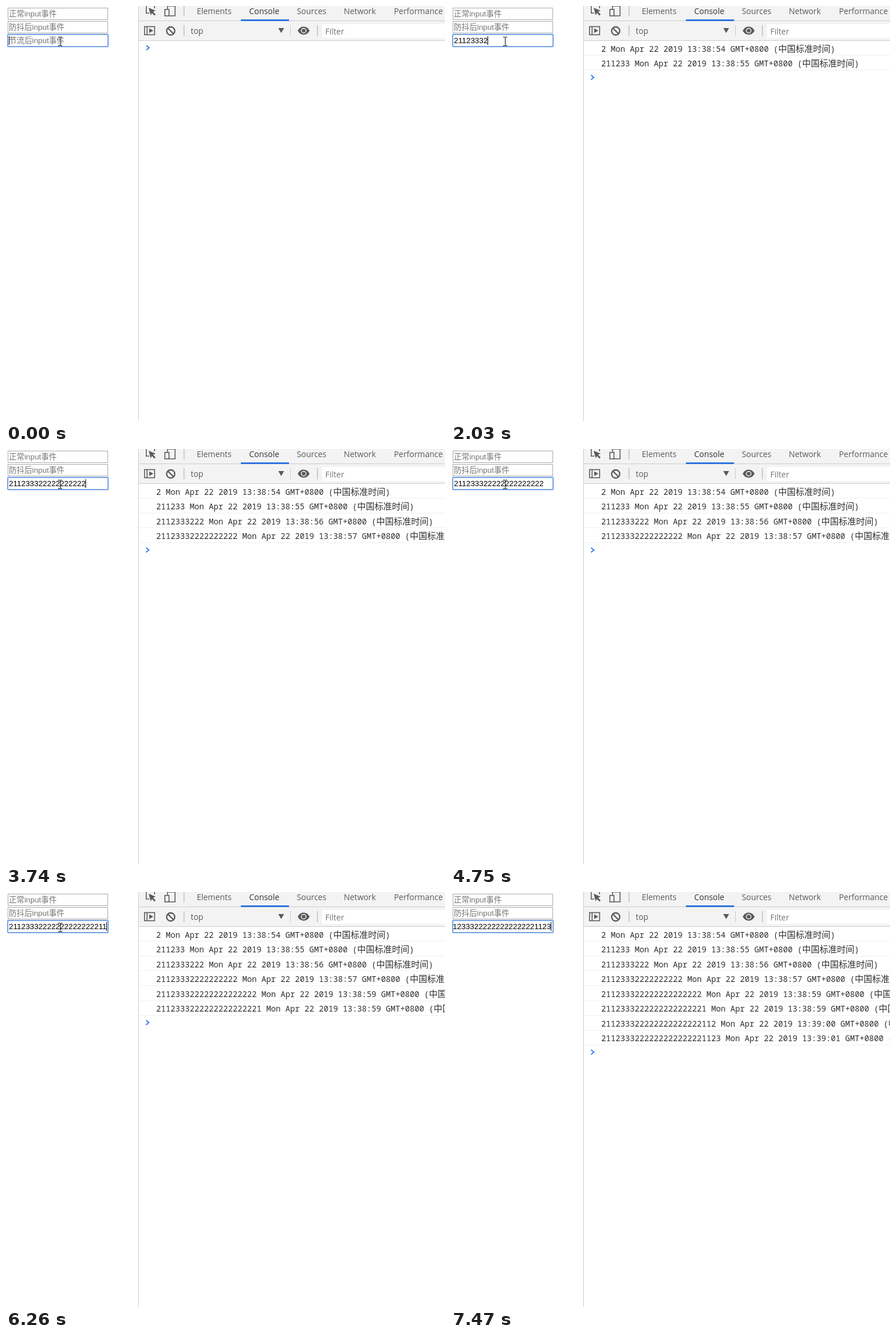
These frames come from a looping animation (757 px wide and 715 px high, 7.55 s). An HTML page:

```html
<!DOCTYPE html>
<html lang="zh-CN">
<head>
<meta charset="utf-8">
<title>Throttled input</title>
<style>
  html, body { margin: 0; width: 100%; height: 100%; overflow: hidden; background: #fff; }
  svg { display: block; }
  .page { font: 13.333px "Liberation Sans", "Noto Sans CJK SC", sans-serif; }
  .hint { fill: #757575; }
  .tools { font: 13.9px "Open Sans", "Noto Sans", sans-serif; fill: #5a5a5a; }
  .log { font: 13.75px "Noto Sans Mono", "Liberation Mono", monospace; fill: #303030; }
  .zone { font: 15px "Noto Sans CJK SC", sans-serif; }
  .line { fill: none; stroke: #5a5a5a; stroke-width: 1.6; }
  .crisp { shape-rendering: crispEdges; }
  #beam { mix-blend-mode: difference; fill: none; stroke: #fff; }
</style>
</head>
<body>
<svg width="757" height="715" viewBox="0 0 757 715">
  <defs>
    <clipPath id="field"><rect x="4" y="50" width="170" height="19"/></clipPath>
  </defs>
  <rect width="757" height="715" fill="#fff"/>

  <g class="page">
    <g class="crisp" fill="#fff" stroke="#a9a9a9">
      <rect x="3.5" y="3.5" width="172" height="20"/>
      <rect x="3.5" y="26.5" width="172" height="20"/>
    </g>
    <rect x="3" y="49" width="173" height="21" rx="1" fill="#fff" stroke="#72a2e6" stroke-width="2"/>
    <text class="hint" x="5" y="18">正常input事件</text>
    <text class="hint" x="5" y="41">防抖后input事件</text>
    <text class="hint" x="5" y="64" id="hint">节流后input事件</text>
    <g clip-path="url(#field)"><text id="typed" y="64"></text></g>
    <rect id="caret" class="crisp" y="52" width="1" height="15"/>
  </g>

  <g class="crisp">
    <rect x="228" width="529" height="60" fill="#f3f3f3"/>
    <path d="M228.5 0V715M229 25.5H757M229 59.5H757" stroke="#ccc"/>
    <rect x="545" y="31" width="212" height="24" fill="#fff"/>
    <path d="M307 0V18M307 33V52M537 33V52" stroke="#ccc" stroke-width="2"/>
    <path d="M490.5 33V52" stroke="#ccc"/>
    <rect x="405" y="23" width="83" height="3" fill="#2f73e0"/>
  </g>

  <g class="tools">
    <text x="329" y="14">Elements</text>
    <text x="419.3" y="14" fill="#333">Console</text>
    <text x="501.5" y="14">Sources</text>
    <text x="582.5" y="14">Network</text>
    <text x="669" y="14">Performance</text>
    <text x="318.5" y="48">top</text>
    <text x="550.5" y="49" fill="#757575">Filter</text>

    <path class="line" d="M241.8 0V12.2H247M256.2 0V4"/>
    <path d="M246 3L258 8L253.6 9.8L258 14.6L256 16.6L251.6 12L249.6 16Z"/>
    <path class="line" d="M278.5 5V0M278.5 0H291.5V17H281"/>
    <rect class="line" x="273.9" y="6" width="7.2" height="11"/>

    <rect class="line" x="238.9" y="35.5" width="17.4" height="14"/>
    <path class="line" d="M243.3 35V50"/>
    <path d="M247 38.5L254 42.5L247 46.5Z"/>
    <g class="line" style="stroke-width:2.3">
      <circle cx="284" cy="43" r="7"/><path d="M279 38L289 48"/>
    </g>
    <path d="M469.5 38H479.5L474.5 46.5Z"/>
    <path d="M503 42.5Q507 35.5 513.3 35.5T523.6 42.5Q519.6 49.5 513.3 49.5T503 42.5Z"/>
    <circle cx="513.3" cy="42.5" r="4" fill="#5a5a5a" stroke="#f3f3f3" stroke-width="1.5"/>
  </g>

  <g id="rows"></g>
  <path id="prompt" d="M242 68L246.8 72L242 76" fill="none" stroke="#367cf1" stroke-width="1.9"/>
  <path id="beam" class="crisp" d="M90 53.5H93M94 53.5H97M93.5 54V68M90 68.5H93M94 68.5H97"/>
</svg>
<script>
const LOOP = 7550;
const ROW = 25.55;
const VALUE = "2112333" + "2".repeat(14) + "1123";
const KEY_TIMES = [
  320, 320, 920, 1000, 1080, 1490, 1710, 2030, 2260, 2490, 2640, 2800, 2950,
  3120, 3270, 3420, 3570, 3740, 3880, 4030, 4200, 5270, 6260, 6290, 6370
];
// time, logged length, clock
const LOGS = [
  [320, 1, "13:38:54"], [1490, 6, "13:38:55"], [2490, 10, "13:38:56"], [3570, 17, "13:38:57"],
  [5210, 21, "13:38:59"], [5270, 22, "13:38:59"], [6290, 24, "13:39:00"], [7300, 25, "13:39:01"]
];
const CARET_OFF = [[850, 920], [4750, 5270], [5820, 6260], [6920, 7470]];
const BEAM_LEAVES = 7390;

const byId = id => document.getElementById(id);
const [hint, typed, caret, rows, prompt, beam] =
  ["hint", "typed", "caret", "rows", "prompt", "beam"].map(byId);
const show = (el, on) => el.setAttribute("visibility", on ? "visible" : "hidden");

rows.innerHTML = LOGS.map(([, length, clock], i) => `
  <g>
    <text class="log" x="259" y="${Math.floor(79.1 + ROW * i)}">${VALUE.slice(0, length)} Mon Apr 22 2019 ${clock} GMT+0800 (<tspan class="zone">中国标准时间</tspan>)</text>
    <rect class="crisp" x="229" y="${Math.floor(59.3 + ROW * (i + 1))}" width="528" height="1" fill="#f0f0f0"/>
  </g>`).join("");

// Digits share one advance; each "11" pair is kerned closer.
function textWidth(text) {
  const pairs = (text.match(/11/g) || []).length;
  return text.length * 7.415 - pairs * 0.99;
}

function draw(time) {
  const text = VALUE.slice(0, KEY_TIMES.filter(t => t <= time).length);
  const width = textWidth(text);
  const scroll = width > 169 ? width - 167.5 : 0;
  if (typed.textContent !== text) typed.textContent = text;
  typed.setAttribute("x", 5 - scroll);
  caret.setAttribute("x", scroll ? 172 : Math.min(173, Math.round(5 + width)));
  show(caret, !CARET_OFF.some(([from, to]) => time >= from && time < to));
  show(hint, !text);

  const count = LOGS.filter(([t]) => t <= time).length;
  [...rows.children].forEach((row, i) => show(row, i < count));
  prompt.setAttribute("transform", `translate(${count ? -0.5 : 0} ${Math.floor(ROW * count)})`);
  show(beam, time < BEAM_LEAVES);
}

const start = performance.now();
function tick() {
  draw((performance.now() - start) % LOOP);
  requestAnimationFrame(tick);
}
tick();
</script>
</body>
</html>
```
